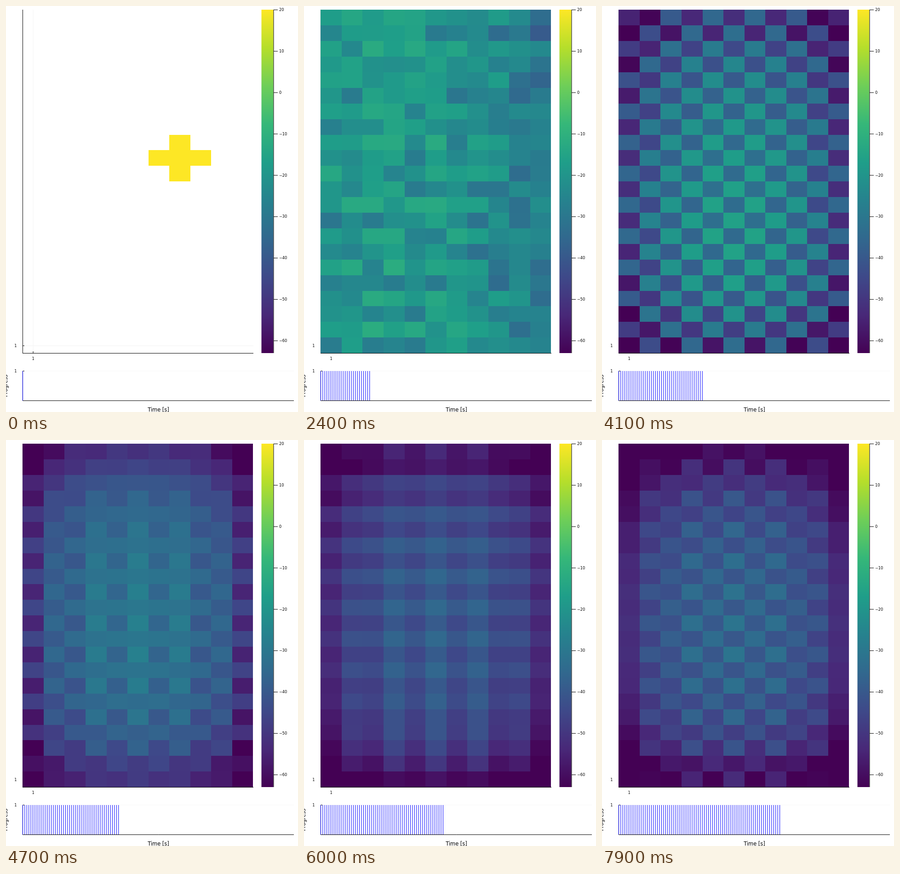
These frames come from a looping animation (635 px wide and 882 px high, 8 s). An HTML page with a canvas:

```html
<!DOCTYPE html>
<html lang="en">
<head>
<meta charset="utf-8">
<title>Decaying wave field</title>
<style>
html, body { margin: 0; width: 100%; height: 100%; overflow: hidden; background: #fff; }
canvas { display: block; }
</style>
</head>
<body>
<canvas id="stage" width="635" height="882"></canvas>
<script>
const ctx = document.getElementById('stage').getContext('2d');
const STEPS = 80, STEP_MS = 100;
const ROWS = 22, COLS = 11, SRC = { row: 9, col: 7 };
const BOX = { x: 36.4, y: 8.4, w: 501, h: 745.8 };
const MAX = 20, MIN = -63;
const VIRIDIS = ['#440154', '#482878', '#3e4989', '#31688e', '#26828e',
  '#1f9e89', '#35b779', '#6ece58', '#b5de2b', '#fde725'];
const RGB = VIRIDIS.map(h => [1, 3, 5].map(i => parseInt(h.slice(i, i + 2), 16)));

const { PI, sin, cos, abs, floor, round, log10 } = Math;
const lerp = (a, b, u) => a + (b - a) * u;
const clamp = (v, lo, hi) => Math.min(hi, Math.max(lo, v));
const dB = amp => 20 * log10(Math.max(amp, .1));

function colour(level) {
  const p = clamp((level - MIN) / (MAX - MIN), 0, 1) * (RGB.length - 1);
  const i = Math.min(RGB.length - 2, floor(p));
  return `rgb(${RGB[i].map((v, k) => round(lerp(v, RGB[i + 1][k], p - i)))})`;
}

// Seeded amplitude noise, in dB around zero with a tail of dark cells.
function noise(r, c, seed) {
  const v = sin(r * 12.9898 + c * 78.233 + seed) * 43758.5453;
  return 4 + .7 * dB(v - floor(v));
}

const scattered = (r, c) =>
  -17 - .22 * (c - 3) ** 2 + 1.5 * cos(PI * r) + noise(r, c, 1);

const fading = (r, c) =>
  -43 - .15 * (c - 5) ** 2 - .05 * (r - 9) ** 2
  + 4 * cos(PI * r) * cos(PI * r / 18)
  + 5 * cos(PI * c) * cos(PI * r / 21) + .5 * noise(r, c, 2);

// Standing wave on four interleaved lattices. Each has a peak level,
// the row of the peak, and how strongly it falls off by row and by column.
function standing(...lattices) {
  return (r, c, n) => {
    const bright = (r + c + n) & 1;
    const half = (r + (n >> 1)) & 1;
    const [peak, mid, rowFall, colFall] = lattices[2 * (1 - bright) + half];
    const span = ROWS - 1;
    const phase = r < mid ? r / mid : (span - r) / (span - mid);
    return peak + rowFall * dB(sin(PI / 2 * phase)) + colFall * dB(sin(PI * c / 10));
  };
}

const KEYS = [
  { n: 24, field: scattered },
  { n: 33, field: fading },
  { n: 41, field: standing([-15, 14, 1, 1], [-15.5, 15, .9, 1], [-34, 12, .9, 1], [-32, 11, 1.3, 1]) },
  { n: 52, field: standing([-21.5, 10, 1.2, .7], [-28, 8, 1, .5], [-36, 6, .7, .9], [-28, 8.5, .9, .8]) },
  { n: 68, field: standing([-32, 13, .65, .7], [-43, 16, .8, .5], [-42, 9, 1.2, .2], [-48, 18, 1.2, .7]) },
  { n: 79, field: standing([-31, 12, 1.1, .9], [-33.5, 11.5, 1.25, .95], [-39.5, 11, 1.2, .6], [-40, 11, 1.1, .6]) }
];

// Level in dB, or null where the wave has not arrived yet.
function level(r, c, n) {
  if (n < 10) {
    const distance = abs(r - SRC.row) + abs(c - SRC.col);
    return distance <= 2 * n + 1 ? MAX : null;
  }
  if (n < KEYS[0].n) return KEYS[0].field(r, c, n) + 8 * (KEYS[0].n - n);
  let i = 0;
  while (i < KEYS.length - 2 && n >= KEYS[i + 1].n) i++;
  const a = KEYS[i], b = KEYS[i + 1], u = (n - a.n) / (b.n - a.n);
  // The main mode crosses zero between its peaks.
  const dip = i > 1 && (r + c + n) & 1 ? 8 * sin(PI * u) ** 2 : 0;
  return lerp(a.field(r, c, n), b.field(r, c, n), u) - dip;
}

function line(x1, y1, x2, y2, stroke = '#000') {
  ctx.strokeStyle = stroke;
  ctx.beginPath();
  ctx.moveTo(x1, y1);
  ctx.lineTo(x2, y2);
  ctx.stroke();
}

function text(str, x, y, size, align) {
  ctx.font = `${size}px "DejaVu Sans", sans-serif`;
  ctx.textAlign = align;
  ctx.fillStyle = '#000';
  ctx.fillText(str, x, y);
}

function drawHeatmap(n) {
  line(59, 8, 59, 754, '#f2f2f2');
  line(36, 738, 538, 738, '#f2f2f2');
  line(36.4, 8, 36.4, 754);
  line(36, 738, 40, 738);
  line(59, 750, 59, 754);
  const edgeX = c => round(BOX.x + c * BOX.w / COLS);
  const edgeY = r => round(BOX.y + r * BOX.h / ROWS);
  for (let r = 0; r < ROWS; r++) {
    for (let c = 0; c < COLS; c++) {
      const v = level(r, c, n);
      if (v === null) continue;
      ctx.fillStyle = colour(v);
      ctx.fillRect(edgeX(c), edgeY(r), edgeX(c + 1) - edgeX(c), edgeY(r + 1) - edgeY(r));
    }
  }
  line(36, 754.4, 538, 754.4);
  text('1', 59, 769, 8.2, 'center');
  text('1', 23.5, 741, 8.2, 'right');
}

function drawColourBar() {
  const fill = ctx.createLinearGradient(0, 754, 0, 8);
  VIRIDIS.forEach((v, i) => fill.addColorStop(i / (VIRIDIS.length - 1), v));
  ctx.fillStyle = fill;
  ctx.fillRect(555.5, 8, 26, 746);
  line(582, 8, 582, 754);
  for (let v = 20; v >= -60; v -= 10) {
    const y = BOX.y + (MAX - v) * BOX.h / (MAX - MIN);
    line(582, y, 591, y);
    text(String(v).replace('-', '\u2212'), 594, y + 2.8, 8.2, 'left');
  }
}

function drawProgress(n) {
  const left = 36.4, right = 626, top = 793, base = 857.4;
  line(left, top, right, top, '#f8f8f8');
  line(left, top, left, base);
  line(left, top, 40, top);
  for (let i = 0; i <= n; i++) {
    const x = left + i * (right - left) / 133;
    line(x, top, x, base, '#00f');
  }
  line(left, base, right, base);
  text('1', 23.5, 796, 8.2, 'right');
  text('Time [s]', 331.5, 880.5, 11.4, 'center');
  ctx.save();
  ctx.translate(2.8, 825);
  ctx.rotate(-PI / 2);
  text('Progress', 0, 0, 11.4, 'center');
  ctx.restore();
}

let shown = -1;
const start = performance.now();
function frame() {
  const n = floor((performance.now() - start) / STEP_MS) % STEPS;
  if (n !== shown) {
    shown = n;
    ctx.fillStyle = '#fff';
    ctx.fillRect(0, 0, 635, 882);
    drawHeatmap(n);
    drawColourBar();
    drawProgress(n);
  }
  requestAnimationFrame(frame);
}
frame();
</script>
</body>
</html>
```
